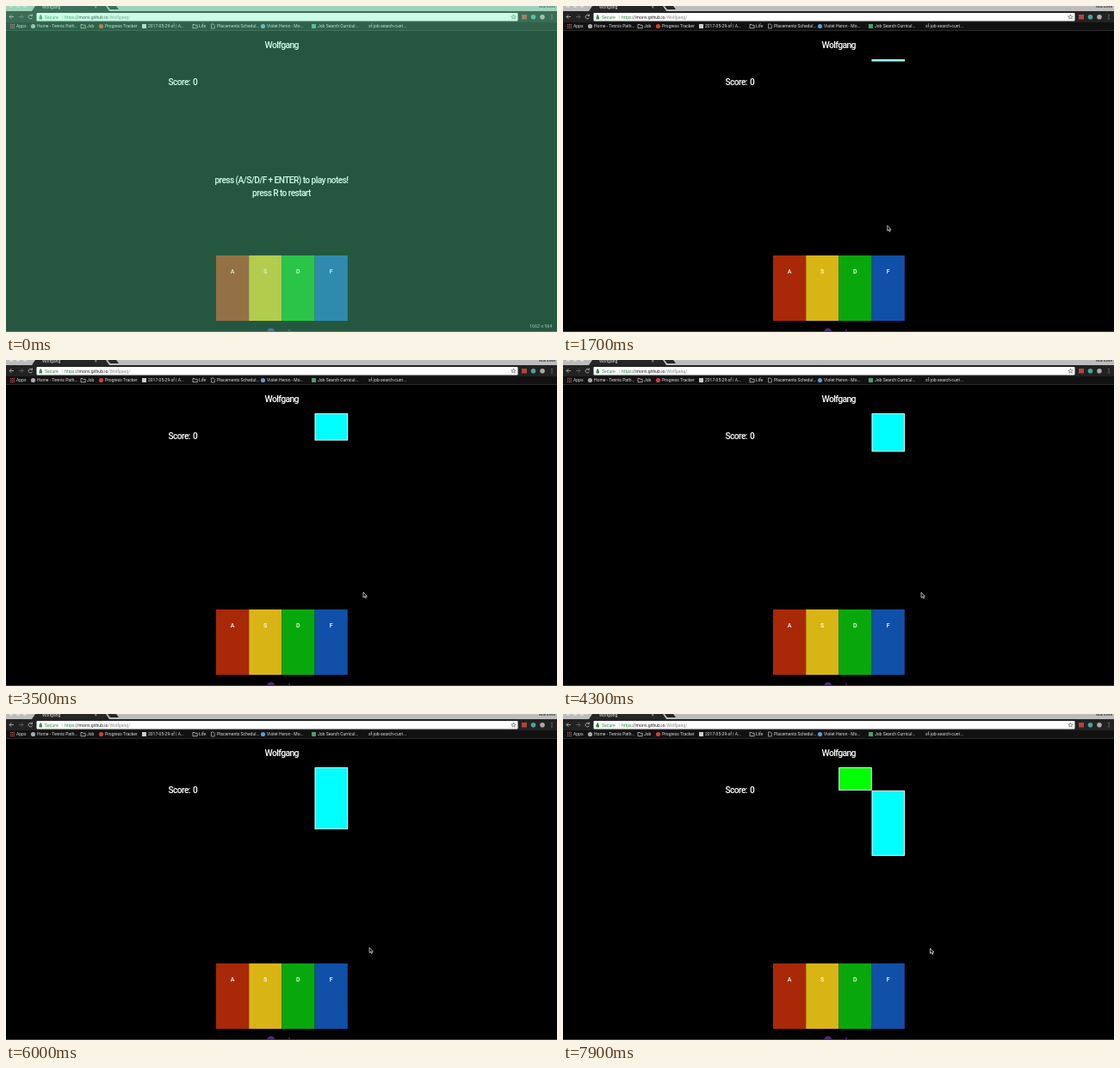
An HTML page for the animation above (8000 ms loop, 640 px wide and 379 px high).

```html
<!DOCTYPE html>
<html lang="en">
<head>
<meta charset="utf-8">
<title>Wolfgang</title>
<style>
  html, body { margin: 0; width: 100%; height: 100%; overflow: hidden; background: #000; }
  svg { display: block; width: 640px; height: 379px; }
  text { font-family: Roboto, sans-serif; }
  .bar { font-size: 5px; fill: #ddd; }
  .game { font-size: 10.2px; font-weight: 500; letter-spacing: -.6px; fill: #fff; }
  .mid { text-anchor: middle; }
  .key { font-size: 7px; font-weight: 500; fill: #fff; text-anchor: middle; }
  .note { stroke: #dff; stroke-width: 1; }
</style>
</head>
<body>
<svg viewBox="0 0 640 379">
  <rect width="640" height="379"/>

  <!-- browser window -->
  <rect width="640" height="6" fill="#bdbdbd"/>
  <path d="M30 6 34 0H116L120 6ZM118 0H128L131 4H121Z" fill="#262626"/>
  <g fill="#ddd"><circle cx="6" cy="0" r="2"/><circle cx="14" cy="0" r="2"/><circle cx="22" cy="0" r="2"/></g>
  <text class="bar" x="42" y="2.5">Wolfgang</text>
  <text class="bar" x="103" y="2.5">×</text>
  <text class="bar" x="619" y="2" style="fill:#222">Marlowe</text>
  <rect y="6" width="640" height="13" fill="#222"/>
  <rect y="19" width="640" height="9" fill="#111"/>
  <path d="M0 28.5H640" stroke="#292929"/>
  <g fill="none" stroke="#bbb" stroke-width=".8">
    <path d="M9 12.5H4M6.5 10 4 12.5 6.5 15"/>
    <path d="M15 12.5H20M17.5 10 20 12.5 17.5 15" stroke="#666"/>
    <path d="M30 11A2.3 2.3 0 1 0 30.5 13.5M30.5 9.5V11.5H28.5"/>
  </g>
  <rect x="35.5" y="8" width="559" height="9.5" rx="1" fill="#fff"/>
  <path d="M38.5 12.5H42V15.5H38.5ZM39.2 12.5V11.2A1 1 0 0 1 41.3 11.2V12.5" fill="#3a8a4c"/>
  <text class="bar" y="14.7" style="fill:#222;font-size:5.1px"><tspan x="45" fill="#3a8a4c">Secure</tspan><tspan x="64.5" fill="#aaa">|</tspan><tspan x="68" fill="#3a8a4c">https</tspan>://morvi.github.io<tspan fill="#888">/Wolfgang/</tspan></text>
  <path d="M589.5 10 590.3 12H592.3L590.7 13.2 591.3 15.2 589.5 14 587.7 15.2 588.3 13.2 586.7 12H588.7Z" fill="none" stroke="#555" stroke-width=".6"/>
  <rect x="599" y="10" width="6" height="5.5" fill="#b5443c"/>
  <circle cx="612.5" cy="12.7" r="2.8" fill="#4ba3a3"/>
  <circle cx="623" cy="12.7" r="2.8" fill="#aaa"/>
  <path d="M634 10v1m0 1.2v1m0 1.2v1" stroke="#bbb"/>
  <g id="bookmarks"></g>

  <!-- game -->
  <text class="game mid" x="320.2" y="49" style="font-size:10.5px;letter-spacing:-.7px">Wolfgang</text>
  <text class="game" x="188.5" y="92">Score:<tspan x="217">0</tspan></text>
  <g id="help">
    <text class="game mid" x="320" y="206">press (A/S/D/F + ENTER) to play notes!</text>
    <text class="game mid" x="320" y="221">press R to restart</text>
  </g>
  <g id="pads"></g>
  <rect class="note" id="blue" x="359" width="37.5" fill="#0ff"/>
  <rect class="note" id="green" x="320.7" width="37.5" fill="#0f0"/>
  <circle cx="307.7" cy="379" r="4.5" fill="#4b2b78"/>
  <circle cx="329" cy="377" r="1" fill="#4b2b78"/>
  <path d="M0 378.5H640" stroke="#0b5a12"/>
  <path id="cursor" d="M0 0V6L1.4 4.8 2.4 7 3.4 6.5 2.5 4.5H4.3Z" fill="#000" stroke="#fff" stroke-width=".7"/>

  <g id="flash">
    <rect width="640" height="379" fill="rgb(108,248,183)" opacity=".35"/>
    <text class="bar" x="608" y="374" style="font-size:5.4px;fill:#a5c4b5">1662 x 964</text>
  </g>
</svg>
<script>
const $ = id => document.getElementById(id);
const LOOP = 8000, START = 1500, TOP = 62, SPEED = .0162, NOTE = 76;

const folder = x => `<path d="M${x} 21.5h2l.6.8h2.6v3.4h-5.2z" fill="none" stroke="#ddd" stroke-width=".7"/>`;
const box = color => x => `<rect x="${x}" y="21" width="5" height="5" fill="${color}"/>`;
const disc = color => x => `<circle cx="${x + 2.5}" cy="23.5" r="2.6" fill="${color}"/>`;
const page = x => `<path d="M${x + .5} 21h2.5l1.3 1.3v3.7h-3.8z" fill="none" stroke="#ddd" stroke-width=".6"/>`;
const apps = x => `<path d="M${x} 21.5h5m-5 2h5m-5 2h5" stroke="#c66" stroke-dasharray="1.2 .7" stroke-width="1.2"/>`;

$('bookmarks').innerHTML = [
  [5, apps, 'Apps'],
  [29, disc('#aaa'), 'Home - Tennis Path...'],
  [87, folder, 'Job'],
  [108, disc('#d0402c'), 'Progress Tracker'],
  [158, box('#ccc'), '2017-05-29-sf | A...'],
  [217, folder, 'Life'],
  [238, page, 'Placements Schedul...'],
  [296, disc('#5a9bd8'), 'Violet Heron - Mo...'],
  [355, box('#4a9f6a'), 'Job Search Curricul...'],
  [414, () => '', 'sf-job-search-curri...']
].map(([x, icon, label]) => icon(x) + `<text class="bar" x="${x + 7}" y="25">${label}</text>`).join('');

const colors = ['#a82808', '#d8b414', '#08a80c', '#1050a8'];
$('pads').innerHTML = [...'ASDF'].map((key, i) => {
  const x = 244 + i * 38.2;
  return `<rect x="${x}" y="290" width="38.2" height="76" fill="${colors[i]}"/>
    <text class="key" x="${x + 19}" y="311">${key}</text>`;
}).join('');

// time, x, y of the pointer tip
const path = [[1700, 376.8, 255.3], [3500, 415, 270], [5100, 417.2, 270.5], [6800, 426.5, 272.5], [LOOP, 426.5, 272.5]];

function pointer(t) {
  if (t <= path[0][0]) return path[0].slice(1);
  const i = path.findIndex(p => t <= p[0]), a = path[i - 1], b = path[i];
  const k = (t - a[0]) / (b[0] - a[0]);
  return [a[1] + (b[1] - a[1]) * k, a[2] + (b[2] - a[2]) * k];
}

const show = (id, on) => { $(id).style.display = on ? '' : 'none'; };

// A note grows out of the top edge, then falls at full height.
function drawNote(id, travel) {
  const top = Math.max(0, travel - NOTE);
  show(id, travel > 0);
  $(id).setAttribute('y', TOP + top + .5);
  $(id).setAttribute('height', Math.max(0, travel - top - 1));
}

function draw(now) {
  const t = Math.floor(now % LOOP / 100) * 100;
  const travel = (t - START - 50) * SPEED;
  show('flash', t < 100);
  show('help', t < START);
  show('cursor', t >= START);
  $('cursor').setAttribute('transform', `translate(${pointer(t)})`);
  drawNote('blue', travel);
  drawNote('green', travel - NOTE);
  requestAnimationFrame(draw);
}
draw(performance.now());
</script>
</body>
</html>
```
